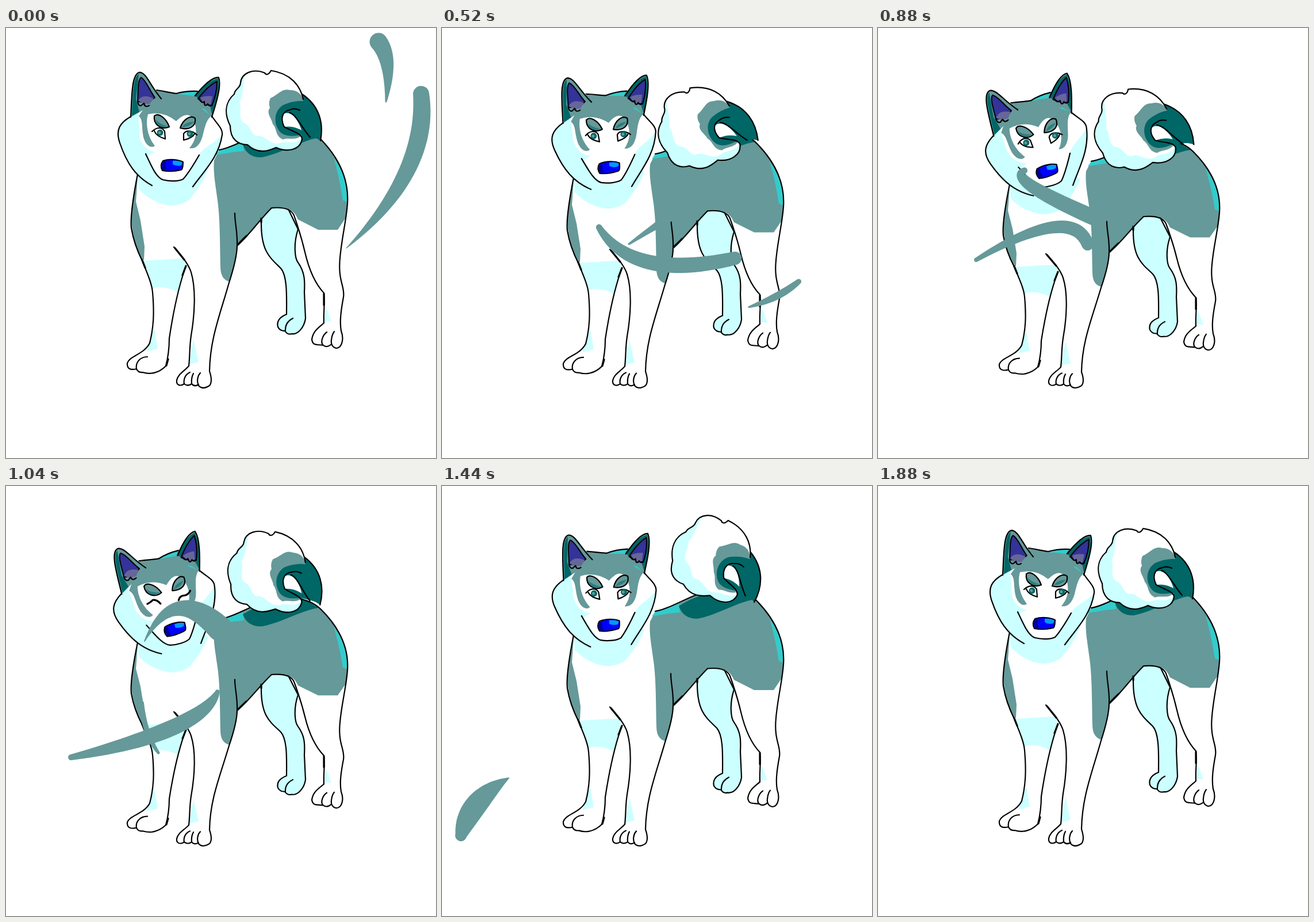
These frames come from a looping animation (748 px wide and 748 px high, 1.92 s). An HTML page:

```html
<!DOCTYPE html>
<html lang="en">
<head>
<meta charset="utf-8">
<title>Dog in the wind</title>
<style>
html, body { margin: 0; width: 100%; height: 100%; overflow: hidden; background: #fff; }
svg { display: block; width: 100vw; height: 100vh; }
path { stroke-linecap: round; stroke-linejoin: round; }
.gray { fill: #699; } .dark { fill: #066; } .bright { fill: #3cc; } .pale { fill: #cff; } .white { fill: #fff; }
.line { fill: none; }
.ink { stroke: #000; stroke-width: 2.2; }
.bold { stroke: #000; stroke-width: 3.2; }
</style>
</head>
<body>
<svg viewBox="0 0 748 748">
  <defs>
    <path id="puff" d="M517 124C512 100 495 79 461 74C457 82 452 82 450 78C430 70 410 78 408 95C408 105 398 105 397 115C380 130 380 150 390 170C390 195 405 203 420 203C440 222 460 212 470 208C490 217 512 212 515 193C514 183 500 181 484 172C478 160 478 145 495 142"/>
    <path id="face" d="M217 154C198 165 190 177 198 200C210 235 225 258 254 274L275 265H308L325 276C345 250 370 225 376 190C378 175 365 165 358 153L332 110H262Z"/>
    <clipPath id="inPuff"><use href="#puff"/></clipPath>
    <clipPath id="inFace"><use href="#face"/></clipPath>
  </defs>

  <g id="body">
    <g id="farLeg">
      <path class="pale ink" d="M462 313C442 320 444 331 444 340C444 390 460 400 478 418C490 432 488 470 488 498C478 502 470 508 473 520C478 530 486 525 486 528Q490 534 497 532C508 534 519 520 521 505L519 460C520 440 520 425 508 408C502 400 500 375 508 350L490 313"/>
      <path class="line ink" d="M486 528C485 516 491 509 499 505"/>
    </g>
    <path class="gray" d="M362 230L371 212C395 208 425 188 455 178C490 170 525 170 548 194C575 222 597 258 594 305L591 330L577 351H543L508 333C500 315 490 311 462 313C440 335 425 358 403 378C402 395 393 428 388 441Q373 437 373 415C372 360 372 330 368 300C364 270 360 250 362 230Z"/>
    <path class="bright" d="M371 212Q402 204 412 199L414 214L395 216L365 221ZM570 226C588 252 596 278 594 303L586 300Q580 260 570 226Z"/>
    <path class="dark" d="M412 203C440 184 480 172 515 173L544 191C515 195 480 218 445 225Q420 226 412 203Z"/>
    <path class="pale" d="M229 254L231 280C250 301 275 309 290 309Q314 306 322 295Q342 270 352 245L330 225H240Z"/>
    <path class="pale" d="M238 405L305 401Q313 407 313 414L298 459Q275 447 254 453ZM258 522L264 558L244 563ZM326 540L335 581L319 585ZM557 485L566 511L554 509Z"/>
    <path class="gray" d="M229 260L226 302L234 335L241 380L240 403L236 404Q212 350 220 305Z"/>
    <path class="line ink" d="M371 212C395 208 425 188 455 178C490 170 525 170 548 194C575 222 597 258 594 305C592 335 584 365 581 400C577 440 590 450 587 468C583 490 580 510 583 527C588 540 585 556 575 557C568 556 565 550 566 543Q567 533 571 528"/>
    <path class="line ink" d="M566 550Q558 557 552 552C546 547 551 534 558 529M552 552C542 550 534 554 532 542C534 526 546 520 553 513C552 495 555 480 553 461C538 445 527 420 520 390Q513 360 501 326Q494 310 462 313C440 335 425 358 403 378"/>
    <path class="line ink" d="M398 322C398 340 403 355 402 378Q402 400 388 443C372 500 355 540 354 597C357 606 359 616 354 622Q342 630 335 622C331 614 334 604 338 600M335 620Q328 625 323 619Q322 608 326 601M323 619Q316 624 310 619C308 610 313 602 320 599"/>
    <path class="line ink" d="M310 619C303 624 296 621 297 613C299 602 310 597 318 588C320 570 319 555 322 535C328 500 331 455 322 425Q317 408 292 381"/>
    <path class="line ink" d="M229 254C222 290 216 330 218 348C222 372 232 395 237 405C245 425 254 445 255 460C258 495 257 520 250 548C240 568 215 570 211 583Q210 597 227 593C225 582 233 572 246 572M227 593Q230 600 238 599C250 603 265 601 278 588Q284 565 284 540C290 500 300 450 313 414"/>
    <path class="line bold" d="M294 383L310 403M403 377L418 362M237 404L242 417M553 462V482M279 587L282 576M444 331V338M307 430L313 414"/>
  </g>

  <g id="tail">
    <use href="#puff" class="white"/>
    <path clip-path="url(#inPuff)" class="pale" d="M420 70C411 92 414 116 406 130C412 140 402 154 413 165C428 170 425 187 438 188C450 185 460 206 478 200C490 195 500 205 518 190V230H370V70Z"/>
    <path class="gray" d="M460 122C475 115 480 104 494 108Q510 108 516 122L520 140L480 170L515 186C505 197 490 190 482 194C468 188 472 176 464 167C462 157 452 148 459 139Q456 130 460 122Z"/>
    <path class="dark" d="M515 115C545 135 553 165 547 196C535 188 528 190 515 186C500 188 485 190 476 180C464 165 467 143 482 134Q500 126 517 127Z"/>
    <path class="white" d="M482 150C494 143 507 155 514 178Q500 170 484 172Q478 160 482 150Z"/>
    <use href="#puff" class="line ink"/>
    <path class="line ink" d="M495 142Q502 139 511 143M515 115C545 135 553 165 547 196M493 147C505 150 515 175 529 190"/>
  </g>

  <g id="head">
    <use href="#face" class="white"/>
    <path clip-path="url(#inFace)" class="pale" d="M190 148H230L232 176C230 195 240 211 259 216L246 222C255 235 258 255 280 267L254 280L190 220ZM380 182C362 203 342 207 335 222L308 264L325 280L380 230Z"/>
    <path class="gray" d="M231 153L262 109L296 114L332 110L358 152C348 160 346 172 342 188Q335 212 319 209C332 194 332 178 328 163Q318 140 296 162Q274 144 247 150C242 168 247 190 259 205C251 211 240 202 238 184C236 168 238 160 231 153Z"/>
    <path class="bright" d="M288 114L332 109L327 118ZM340 140L358 142L357 153Z"/>
    <path class="gray" d="M217 155C219 120 218 78 233 77C245 79 250 99 270 123L247 138ZM329 118C345 98 360 85 370 86C375 100 366 130 358 155L345 140Z"/>
    <path class="dark" d="M219 153C221 125 220 85 231 80L226 123L232 146ZM329 118Q348 92 369 88Q373 120 358 150L355 135L360 98L336 124Z"/>
    <path class="line ink" d="M217 155C219 120 218 78 233 77C245 79 250 99 270 123M329 118C345 98 360 85 370 86C375 100 366 130 358 155"/>
    <path fill="#339" stroke="#000" stroke-width="2" d="M229 128C230 110 229 90 235 86C244 91 249 108 259 121L247 130ZM334 123C345 109 358 97 367 93Q367 115 358 135L347 133Z"/>
    <path fill="#669" d="M230 126Q238 113 257 123L250 132L239 133ZM338 121Q347 117 359 119L356 133L345 135Z"/>
    <path class="line ink" d="M229 128Q230 136 235 135L240 131Q241 139 249 135M336 123Q340 132 345 128Q345 139 351 132Q354 138 358 134"/>
    <path class="line ink" d="M262 108C280 111 288 113 296 114Q314 109 333 110M217 154C198 165 190 177 198 200C210 235 225 258 254 274M358 153C365 165 378 175 376 186C370 225 345 248 325 276M243 219C253 240 261 260 273 264C285 267 300 267 308 263C318 252 328 235 336 221"/>
    <path class="gray ink" d="M258 153C264 147 278 155 284 172C270 178 256 168 258 153ZM329 157C322 151 308 158 303 174C318 178 331 172 329 157Z"/>
    <path class="dark" d="M260 159Q267 167 281 171Q263 176 260 159ZM327 163Q320 171 306 173Q312 163 327 163Z" opacity=".55"/>
    <g id="open">
      <path class="white ink" d="M254 180C262 172 272 172 276 180L277 193Q261 188 258 179M332 186C324 178 313 177 309 184V195Q325 191 328 184"/>
      <g class="dark"><circle cx="268" cy="182" r="5.5"/><circle cx="320" cy="184" r="5.5"/></g>
      <g class="gray"><circle cx="267" cy="182" r="2.5"/><circle cx="319" cy="184" r="2.5"/></g>
    </g>
    <path id="closed" class="line bold" d="M255 184Q263 182 266 180Q273 181 277 190M309 193Q313 186 321 188Q328 189 333 183"/>
    <path fill="#00f" stroke="#000" stroke-width="2" d="M273 231C285 227 300 229 308 233Q308 247 304 247Q288 251 272 248Q267 239 273 231Z"/>
    <path fill="#009" d="M273 233L278 232Q276 240 280 247H273Q269 239 273 233Z"/>
    <path fill="#09f" d="M290 231Q300 230 307 234L305 239Q296 241 290 237Z"/>
  </g>

  <g id="wind" class="gray"></g>
</svg>
<script>
const LOOP = 1920, STEP = 40;
const $ = id => document.getElementById(id);
const streaks = [];

// Each pose: time, three curve points, three widths. The width grows from birth and shrinks to death.
function streak(birth, death, ...poses) {
  const path = document.createElementNS("http://www.w3.org/2000/svg", "path");
  $("wind").append(path);
  streaks.push({ birth, death, poses, path });
}

streak(0, 1720,
  [0, 648,24, 672,54, 661,128, 31,27,3],
  [320, 680,161, 667,327, 422,417, 34,63,2],
  [720, 362,396, 337,182, 228,335, 35,8,5],
  [1040, 368,358, 340,425, 113,472, 8,47,10],
  [1200, 226,427, 130,430, 49,510, 8,25,32],
  [1440, 116,508, 50,545, 33,608, 2,64,20]);
streak(0, 1180,
  [0, 722,114, 737,250, 592,383, 28,41,1],
  [320, 642,390, 508,525, 278,467, 34,48,1],
  [720, 378,411, 153,358, 268,226, 12,21,20],
  [1040, 372,248, 292,168, 241,270, 44,27,2]);
streak(200, 840,
  [320, 717,384, 695,430, 649,459, 14,20,3],
  [720, 524,498, 475,511, 418,512, 4,18,3]);
streak(1100, 1360, [1200, 380,355, 350,430, 292,445, 44,28,20]);
streak(960, 1160, [1040, 236,378, 240,430, 265,464, 8,12,5]);

const curve = (s, a, b, c) => (1 - s) ** 2 * a + 2 * s * (1 - s) * b + s * s * c;
const slope = (s, a, b, c) => (1 - s) * (b - a) + s * (c - b);

function ribbon([, x0, y0, x1, y1, x2, y2, ...ws], size) {
  const near = [], far = [], n = 28;
  const widths = ws.map(w => w * size);
  for (let i = 0; i <= n; i++) {
    const s = i / n, x = curve(s, x0, x1, x2), y = curve(s, y0, y1, y2);
    const dx = slope(s, x0, x1, x2), dy = slope(s, y0, y1, y2);
    const k = curve(s, ...widths) / 2 / (Math.hypot(dx, dy) || 1);
    const side = d => `${(x - d * dy * k).toFixed(1)} ${(y + d * dx * k).toFixed(1)}`;
    near.push(side(1));
    far.unshift(side(-1));
  }
  const cap = (w, to) => `A${w / 2} ${w / 2} 0 0 0 ${to}`;
  return "M" + near.join("L") + cap(widths[2], far[0]) + "L" + far.join("L") + cap(widths[0], near[0]) + "Z";
}

function streakShape({ birth, death, poses }, t) {
  const first = poses[0], last = poses[poses.length - 1];
  if (t < birth || t >= death) return "";
  if (t < first[0]) return ribbon(first, (t - birth) / (first[0] - birth));
  if (t >= last[0]) return ribbon(last, (death - t) / (death - last[0]));
  const i = poses.findIndex(p => t < p[0]);
  const a = poses[i - 1], b = poses[i], f = (t - a[0]) / (b[0] - a[0]);
  return ribbon(a.map((v, j) => v + (b[j] - v) * f), 1);
}

function tailAngle(t) {
  if (t < 720) return -33 * (t / 720) ** 2;
  if (t < 1280) return -33 + 64 * (t - 720) / 560;
  return 31 * ((LOOP - t) / 640) ** 2;
}

function draw(t) {
  const breath = (1 - Math.abs(t - 960) / 960) ** 2;
  $("body").setAttribute("transform", `translate(0 626) scale(1 ${1 - 0.0572 * breath}) translate(0 -626)`);
  $("head").setAttribute("transform", `rotate(${-19.5 * breath} 324 226)`);
  $("tail").setAttribute("transform", `translate(0 ${12 * breath}) rotate(${tailAngle(t)} 535 185)`);

  const blink = t >= 920 && t < 1120;
  $("open").style.display = blink ? "none" : "";
  $("closed").style.display = blink ? "" : "none";

  for (const s of streaks) s.path.setAttribute("d", streakShape(s, t));
}

const start = performance.now();
function tick() {
  const t = (performance.now() - start) % LOOP;
  draw(Math.floor(t / STEP) * STEP);
  requestAnimationFrame(tick);
}
tick();
</script>
</body>
</html>
```
